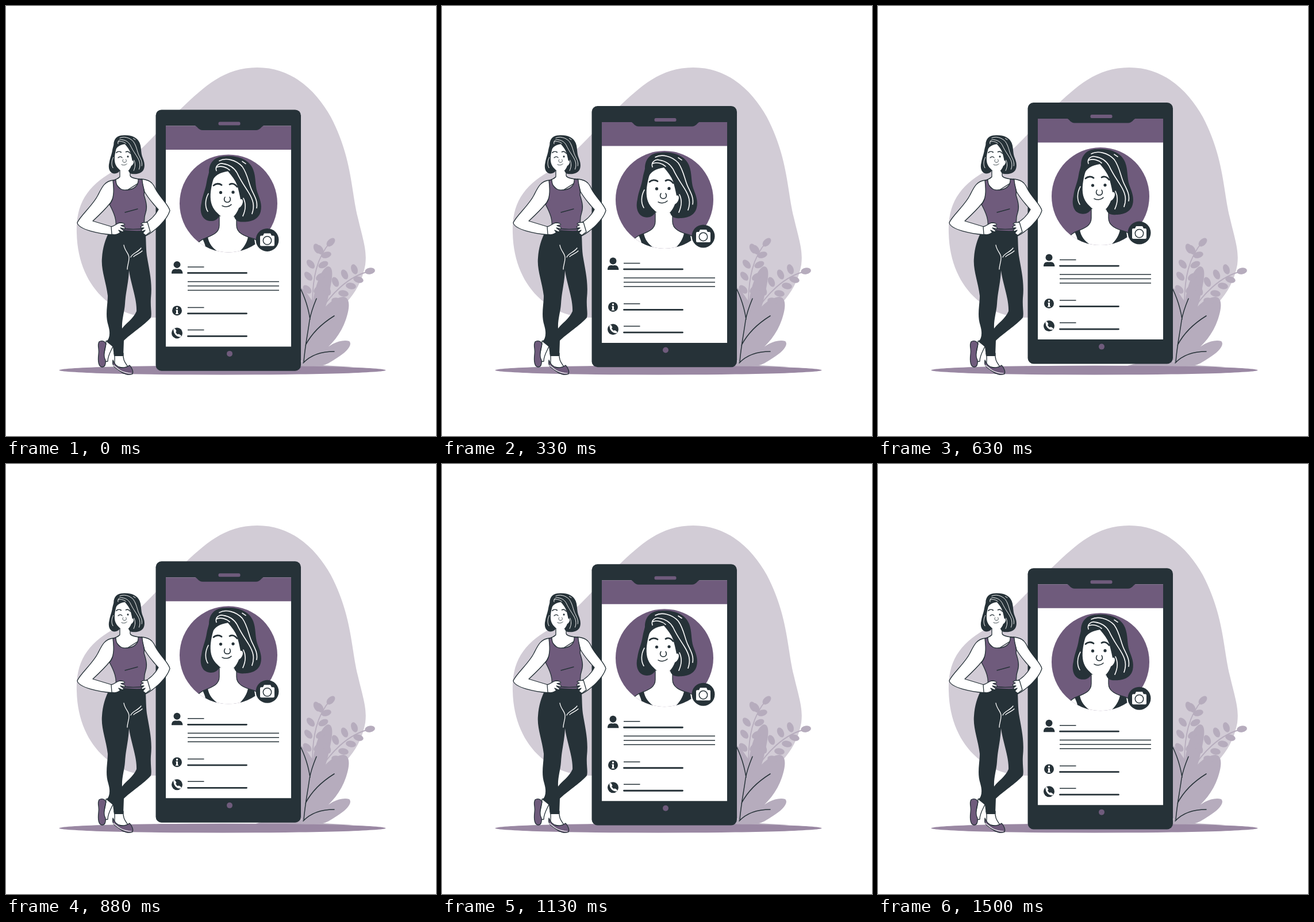
An HTML page for the animation above (1540 ms loop, 748 by 748 pixels).

```html
<!DOCTYPE html>
<html lang="en">
<head>
<meta charset="utf-8">
<title>Profile</title>
<style>
  html, body { margin: 0; height: 100%; overflow: hidden; background: #fff; }
  svg { display: block; width: 100vw; height: 100vh; }
  .dark { fill: #263238; }
  .plum { fill: #6f5b7c; }
  .leaf { fill: #b6acbd; }
  .white { fill: #fff; }
  .line { fill: none; stroke: #263238; stroke-width: 1.5; stroke-linecap: round; stroke-linejoin: round; }
  .light { fill: none; stroke: #fff; stroke-width: 1.6; stroke-linecap: round; }
  .inked { stroke: #263238; stroke-width: 1.3; stroke-linejoin: round; stroke-linecap: round; }
</style>
</head>
<body>
<svg viewBox="0 0 748 748">
  <defs>
    <clipPath id="avatar"><circle cx="387" cy="344" r="85"/></clipPath>
    <g id="head">
      <path class="dark" d="M353 290C353 271 365 262 380 262C402 260 423 267 430 285C435 298 433 311 437 324C441 335 446 345 443 358C440 371 427 376 414 376C405 377 399 374 397 367L371 366C367 375 355 377 347 372C339 367 337 355 340 343C342 329 347 320 349 307C350 300 352 295 353 290Z"/>
      <path class="white" d="M360 304C362 296 372 290 386 288C393 296 399 304 402 312C405 322 407 332 408 337C412 335 413 341 411 345C409 350 406 351 405 352C402 360 397 367 391 371C387 373 382 373 377 369C369 362 360 355 357 343C354 330 357 315 360 304Z"/>
      <path class="light" d="M366 287C363 278 372 273 378 275C392 277 398 284 402 291C409 306 414 312 422 325C430 338 433 348 428 362M371 270C382 264 400 268 411 280C421 294 422 310 428 322C434 334 438 342 436 352M367 281C374 278 384 281 389 286M352 327C346 338 346 350 351 358M413 335C418 345 417 355 412 366M411 271L417 275"/>
      <path class="line" style="stroke-width:2.800" d="M361 313C365 309 371 309 375 312M389 311C394 308 399 311 402 315"/>
      <path class="line" d="M381 333C378 337 380 342 385 342C390 342 392 337 389 333M376 348C381 351 388 350 392 346"/>
      <circle class="dark" cx="395" cy="324.500" r="2.600"/>
    </g>
  </defs>

  <path fill="#d2ccd6" d="M437 107C500 107 541 150 565 193C602 264 600 320 612 368C622 410 628 425 625 450C616 500 580 545 500 565C420 580 360 540 262 542C190 545 125 490 123 395C121 338 147 309 193 284C240 250 270 210 305 178C345 140 380 107 437 107Z"/>

  <g id="plants" class="leaf">
    <path d="M513 490C522 495 529 508 534 515C537 490 549 453 561 453C572 455 567 479 559 513L530 610L510 618Z"/>
    <path d="M513 621C523 568 550 510 586 506C601 506 597 529 591 546C583 570 566 590 547 605C562 588 583 579 597 583C604 590 591 603 576 612C564 620 557 624 551 625L605 628H430C445 620 480 618 513 612Z"/>
    <path fill="none" stroke="#b6acbd" stroke-width="1.800" d="M533 520C533 475 540 437 565 410M543 536C563 504 594 469 635 461"/>
  </g>
  <path class="line" d="M513 493C523 514 527 532 529 545M540 509C533 526 530 535 528 547C525 570 520 592 518 619M571 539C550 552 532 569 521 590M571 601C551 601 531 606 517 621"/>

  <ellipse cx="376.500" cy="633.500" rx="284" ry="8" fill="#9a88a3"/>

  <g id="phone">
    <rect class="dark" x="260.500" y="181" width="252.500" height="454.300" rx="10"/>
    <path class="white" d="M278 209H496V593H278Z"/>
    <path class="plum" d="M278 209H496V250.500H278Z"/>
    <path class="dark" d="M328 208C334 211 335 216.500 342 216.500H435C442 216.500 443 211 449 208Z"/>
    <rect class="plum" x="369.500" y="202" width="38" height="6" rx="2.500"/>
    <circle class="plum" cx="389" cy="605.500" r="5"/>

    <circle class="plum" cx="387" cy="344" r="85"/>
    <g clip-path="url(#avatar)">
      <path class="white inked" d="M371 360V382C371 396 358 400 343 406C334 411 326 418 322 436H452C447 417 440 409 430 405C414 401 401 395 401 382V360Z"/>
      <path class="dark" d="M342 406L351 402C353 415 361 424 375 432H348C349 421 345 412 342 406ZM421 402L432 406C434 416 434 426 435 434H399C411 425 419 414 421 402Z"/>
    </g>
    <use href="#head"/>
    <circle class="dark" cx="373.500" cy="325" r="2.600"/>
    <circle class="dark" cx="454.500" cy="407.500" r="20"/>
    <path class="white" d="M444 400H447L449 396H460L462 400H465Q467 400 467 402V416Q467 418 465 418H444Q442 418 442 416V402Q442 400 444 400Z"/>
    <circle class="line" cx="454.500" cy="408.500" r="7.200"/>

    <g class="dark">
      <circle cx="297.500" cy="450.500" r="6"/>
      <path d="M288 466C288 460 291 457 297.500 458.500C304 457 307 460 307.500 466Z"/>
      <circle cx="297.500" cy="530.500" r="8.500"/>
      <circle cx="297.500" cy="569.500" r="9.500"/>
    </g>
    <path class="white" d="M296 524.500h3v3h-3zM295.500 529H299V535H300V536.500H295V535H296V530.500H295.500Z"/>
    <path class="light" style="stroke-width:3" d="M293 564.500C293 569.500 297 574.500 302 574.500"/>
    <path class="light" style="stroke-width:3.500" d="M293 563.500L294.500 566M300.500 573L303 574.500"/>
    <path class="line" style="stroke-linecap:butt" d="M316 454.500H344.500M316 480H475M316 487.500H475M316 495H475M316 525H344.500M316 564H344.500"/>
    <path class="line" style="stroke-width:2.800" d="M316.500 465H418.500M316.500 535.500H418.500M316.500 575H418.500"/>
  </g>

  <g id="woman">
    <path class="white inked" d="M174 583C174 598 168 605 170 619L177 618C177 607 183 600 187 590L186 580ZM188 604C191 614 187 621 190 627L214 631C209 621 203 619 204 604Z"/>
    <path class="plum inked" d="M162 584C167 581 172 583 174 588C171 600 169 609 173 616C174 623 172 628 167 628C160 627 160 615 161 606C163 596 158 591 162 584ZM186 616C188 622 192 627 199 629C206 630 212 627 215 625C219 629 222 636 220 640C213 643 204 640 197 634C191 629 184 628 186 616Z"/>
    <path class="light" style="stroke-width:1.200" d="M187 625C193 630 200 638 218 639"/>
    <path class="dark" fill-rule="evenodd" d="M190 389H242C244 401 243 418 245 434C249 459 255 480 252 508C251 525 254 534 252 542C241 555 216 571 205 582L204 609H188L186 593L175 584C180 578 182 570 178 556C172 538 177 520 177 504C174 479 165 459 167 438C168 421 173 405 179 394ZM214 460C217 483 228 510 227 531C221 545 208 552 202 561C201 546 206 533 207 518C208 499 213 482 214 460Z"/>
    <path class="light" style="stroke-width:1.300" d="M205 416C207 427 214 430 214 438C214 446 211 451 211 458M235 421C229 429 220 430 217 437M237 426C232 431 226 432 222 436"/>

    <path class="white inked" d="M198 284V297C195 301 189 302 185 304L205 324L240 302C230 301 217 300 216 295V281Z"/>
    <path class="white inked" d="M187 303C172 304 167 315 160 329C151 347 129 365 124 377C126 389 162 396 186 398L193 387L184 384L151 374C163 363 174 352 182 342L188 330Z"/>
    <path class="white inked" d="M235 301C248 302 255 306 260 318C266 331 284 347 285 356C280 373 258 392 243 400L239 379C250 374 260 364 265 354C258 346 249 337 241 323Z"/>
    <path class="plum inked" d="M186 304L191 302C191 314 199 321 209 320C221 320 231 314 230 301L237 302C237 313 242 320 240 329C244 341 246 350 243 359C239 370 240 380 243 391C226 393 206 391 190 388C194 374 188 360 180 345C188 337 188 319 186 304Z"/>
    <path class="line" style="stroke-width:1.300" d="M207 359L229 353M191 385C208 389 226 389 242 387"/>
    <path class="white inked" d="M183 384C189 383 192 378 198 377C203 377 208 379 206 381L200 382L207 385L207 388L199 386L205 391L203 393L196 390L199 394C194 397 190 399 184 397Z"/>
    <path class="white inked" d="M246 376C241 377 236 376 235 379L239 381L234 384L235 386L240 386L235 390L237 392L242 390L238 395L243 399L251 393Z"/>
    <use href="#head" transform="translate(179 225) scale(.59) translate(-339 -262)"/>
    <path class="line" style="stroke-width:1.200" d="M195 264C198 261 201 262 202 264"/>
  </g>
</svg>
<script>
  const NS = "http://www.w3.org/2000/svg";
  const plants = document.getElementById("plants");
  const phone = document.getElementById("phone");

  // x, y and tilt of the small leaves on the two sprigs
  const sprigs = [
    [565, 411, -45], [546, 424, 60], [557, 433, -15], [541, 422, 65],
    [530, 449, 50], [552, 450, -25], [526, 470, 50], [547, 471, -35],
    [524, 493, 45], [543, 493, -40],
    [633, 461, -10], [606, 458, 70], [613, 476, 15], [589, 467, 65],
    [600, 487, 10], [573, 480, 65], [587, 500, 10], [559, 495, 65], [575, 513, 10]
  ];
  for (const [x, y, tilt] of sprigs) {
    const leaf = document.createElementNS(NS, "ellipse");
    leaf.setAttribute("rx", 9);
    leaf.setAttribute("ry", 5.5);
    leaf.setAttribute("transform", `translate(${x} ${y}) rotate(${tilt})`);
    plants.append(leaf);
  }

  const LOOP = 1540, LIFT = 15, PHASE = 0.03;

  // The phone floats up and down at constant speed
  function draw(now) {
    const p = (now / LOOP + PHASE) % 1;
    const y = 0.3 - LIFT * (1 - Math.abs(2 * p - 1));
    phone.setAttribute("transform", `translate(0 ${y.toFixed(2)})`);
    requestAnimationFrame(draw);
  }
  draw(0);
</script>
</body>
</html>
```
